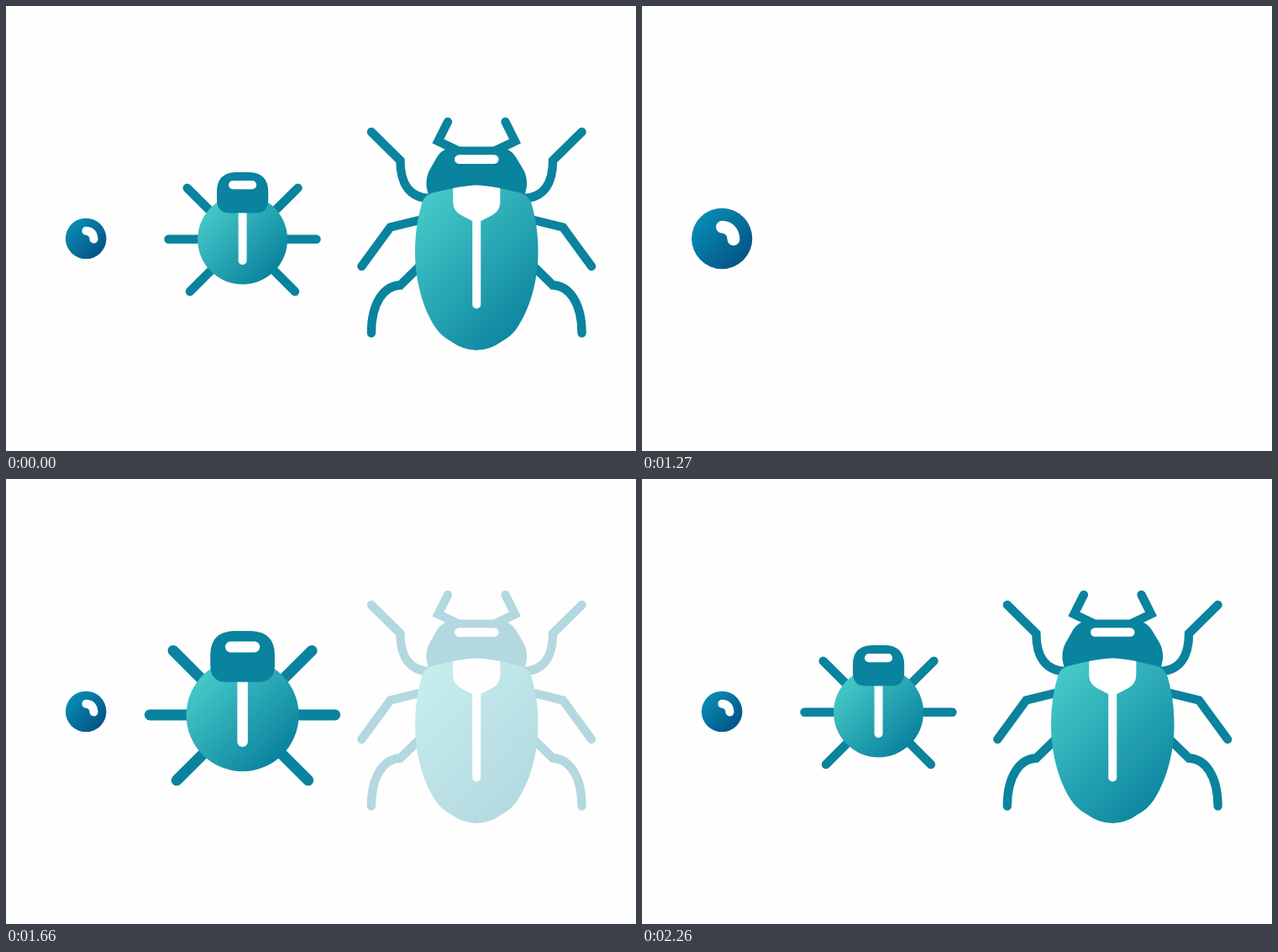
Animation of 750x530 px, one loop 4.57 s. Source, as an HTML page:

```html
<!DOCTYPE html>
<html lang="en">
<head>
<meta charset="utf-8">
<title>Growing bugs</title>
<style>
  html, body { margin: 0; width: 100%; height: 100%; overflow: hidden; background: #fefefe; }
  svg { display: block; width: 750px; height: 530px; }
  .line { fill: none; stroke: #0a839e; stroke-width: 10.4; stroke-linecap: round; stroke-linejoin: miter; }
  .dark { fill: #0a839e; }
  .white { fill: #fff; }
  .shine { fill: none; stroke: #fff; stroke-width: 10; stroke-linecap: round; }
</style>
</head>
<body>
<svg viewBox="0 0 750 530">
  <defs>
    <linearGradient id="dotFill" gradientUnits="userSpaceOnUse" x1="78" y1="260" x2="112" y2="294">
      <stop offset="0" stop-color="#078bb4"/><stop offset="1" stop-color="#045586"/>
    </linearGradient>
    <linearGradient id="bugFill" gradientUnits="userSpaceOnUse" x1="244" y1="240" x2="319" y2="316">
      <stop offset="0" stop-color="#45c8c8"/><stop offset="1" stop-color="#0a839e"/>
    </linearGradient>
    <linearGradient id="beetleFill" gradientUnits="userSpaceOnUse" x1="490" y1="241" x2="630" y2="381">
      <stop offset="0" stop-color="#45c8c8"/><stop offset="1" stop-color="#0a839e"/>
    </linearGradient>
    <g id="side" class="line">
      <path d="M685.5 150L651 184C651 211 641 229 614 229.5"/>
      <path d="M697 310L663 263.5L624 254"/>
      <path d="M685.5 389.5C685.5 353 670 333 651 332.5L626 308"/>
      <path d="M594.5 138L606 161L582 172.5"/>
    </g>
  </defs>

  <g id="beetle">
    <use href="#side"/>
    <use href="#side" transform="matrix(-1 0 0 1 1120.4 0)"/>
    <path class="dark" d="M537 167.5H583Q599 167.5 607 180L616 195Q621 204 619.7 216L616 233H504.5L500.7 216Q499.5 204 504.5 195L513 180Q521 167.5 537 167.5Z"/>
    <rect class="white" x="534" y="177.3" width="52.5" height="10.6" rx="5.3"/>
    <path fill="url(#beetleFill)" d="M560.2 213.5Q575 213.5 612 222.5Q622 225 625.5 235Q633.5 262 633.5 293C633.5 330 622 364 608 384Q602 393 591 399Q576 410 560.2 410Q544 410 529 399Q518 393 512 384C498 364 487 330 487 293Q487 262 495 235Q498 225 508 222.5Q545 213.5 560.2 213.5Z"/>
    <path class="white" d="M560.2 213.5Q569.5 213.5 588.3 217.1V234Q588 244 579 249L565.5 256H555L541.5 249Q532.5 244 532.2 234V217.1Q551 213.5 560.2 213.5Z"/>
    <path class="shine" d="M560.2 250V355.5"/>
  </g>

  <g id="bug">
    <path class="line" d="M193.5 277.8H369.5M215.7 216.7L245 246M347.5 216.7L318 246M219 340L248 311M344 340L315 311"/>
    <circle cx="281.6" cy="278" r="53.5" fill="url(#bugFill)"/>
    <path class="shine" d="M281.6 242V303.3"/>
    <path class="dark" d="M273 198H290Q312.2 199 312.2 221V231.5Q311.7 246 297.5 246.5H265.5Q251.5 246 251 231.5V221Q251 199 273 198Z"/>
    <rect class="white" x="265.1" y="208" width="33" height="10.3" rx="5.1"/>
  </g>

  <g id="dot">
    <circle cx="95.2" cy="277" r="24.3" fill="url(#dotFill)"/>
    <path class="shine" d="M95.4 267.7Q104 268.5 104.5 277.6"/>
  </g>
</svg>
<script>
const LOOP = 4570, STEP = 30, GHOST = 0.02;
const RISE = 120, FALL = 500;

// show: start of the fade-in, pop: start of the scale pulse
const parts = [
  { id: 'dot', x: 95.2, y: 277, peak: 2, show: 965, pop: 1000 },
  { id: 'bug', x: 281.6, y: 265.2, peak: 2, show: 1270, pop: 1315 },
  { id: 'beetle', x: 560.2, y: 272, peak: 1.2, show: 1570, pop: 1680 }
].map(p => ({ ...p, el: document.getElementById(p.id) }));

const clamp = v => Math.min(1, Math.max(0, v));

// cubic-bezier(.25, .1, .25, 1)
function ease(x) {
  if (x <= 0 || x >= 1) return clamp(x);
  let lo = 0, hi = 1, s;
  for (let i = 0; i < 24; i++) {
    s = (lo + hi) / 2;
    if (0.75 * s * (1 - s) + s ** 3 < x) lo = s; else hi = s;
  }
  return 0.3 * s * (1 - s) ** 2 + 3 * s * s * (1 - s) + s ** 3;
}

function opacity(p, t) {
  if (t < 900) return Math.max(GHOST, 1 - clamp((t - 30) / 150));
  return Math.max(t < 1030 ? GHOST : 0, clamp((t - p.show) / 300));
}

function scale(p, t) {
  const e = t - p.pop;
  const k = e < RISE ? ease(e / RISE) : 1 - ease((e - RISE) / FALL);
  return 1 + (p.peak - 1) * k;
}

function draw(now) {
  const raw = now % LOOP;
  const base = raw < 1000 ? 0 : 1000;
  const t = base + Math.floor((raw - base) / STEP) * STEP;
  for (const p of parts) {
    const s = scale(p, t);
    p.el.setAttribute('opacity', opacity(p, t));
    p.el.setAttribute('transform', `translate(${p.x} ${p.y}) scale(${s}) translate(${-p.x} ${-p.y})`);
  }
}

const start = performance.now();
function tick() {
  draw(performance.now() - start);
  requestAnimationFrame(tick);
}
tick();
</script>
</body>
</html>
```
